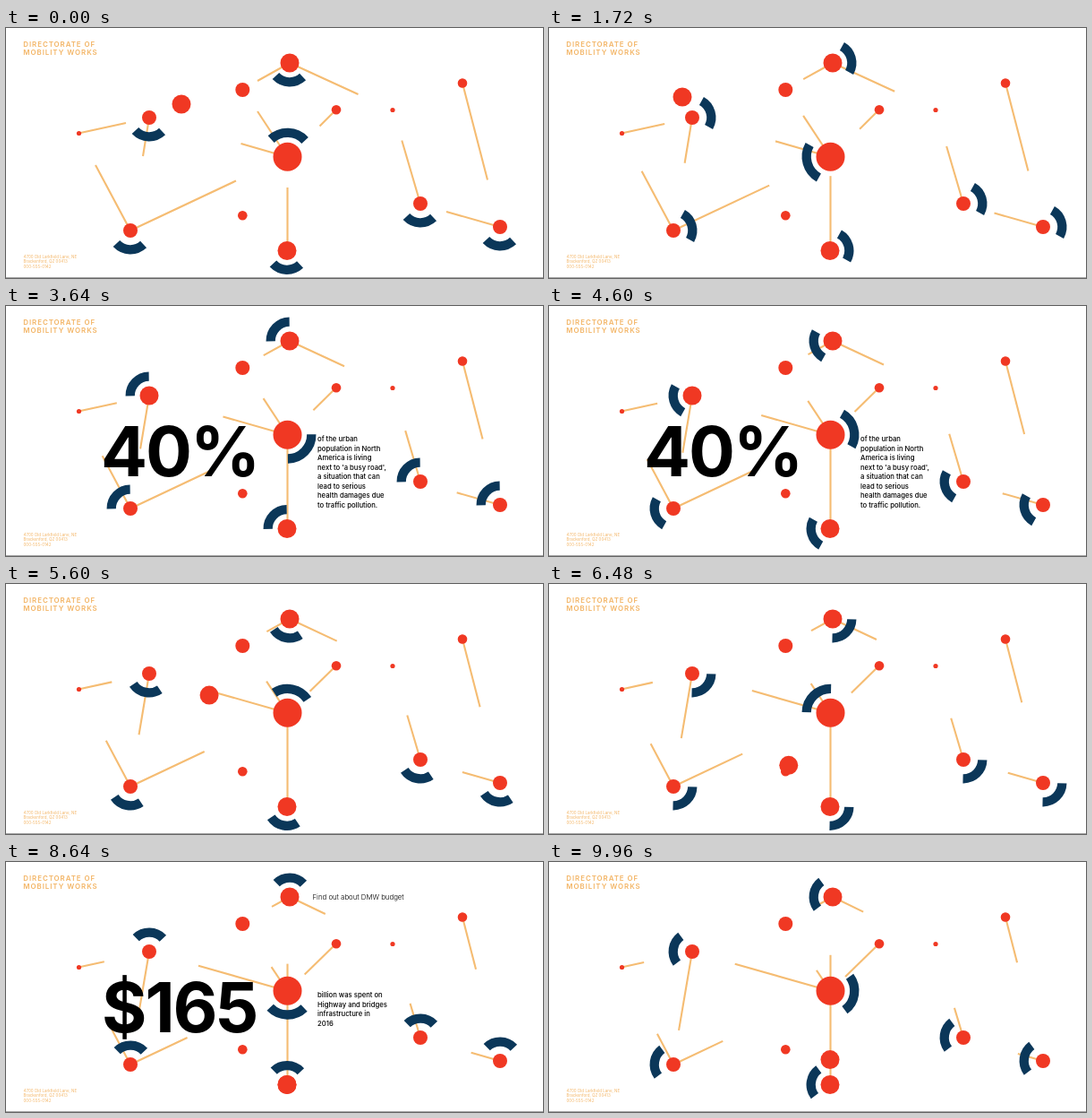
An HTML page that plays this animation: 600x279 px, repeating every 10000 ms.

```html
<!DOCTYPE html>
<html lang="en">
<head>
<meta charset="utf-8">
<style>
  html, body { margin: 0; width: 100%; height: 100%; overflow: hidden; background: #fff; }
  svg { display: block; width: 600px; height: 279px; font-family: Inter, sans-serif; }
  .line { stroke: #f5bc72; stroke-width: 2.1; }
  .arc { fill: none; stroke: #0b3759; stroke-width: 10.3; }
  .disc { fill: #f03823; }
  .gold { fill: #f3b566; }
  .head { font-size: 7.9px; font-weight: 600; letter-spacing: .95px; }
  .contact { font-size: 4.5px; }
  .big { font-size: 77px; font-weight: 700; letter-spacing: -2px; }
  .body { font-size: 7.7px; font-weight: 500; }
  .note { font-size: 7.8px; font-weight: 300; }
</style>
</head>
<body>
<svg id="stage" viewBox="0 0 600 279"></svg>
<script>
const LOOP = 10000;
const stage = document.getElementById('stage');

function add(tag, attrs, parent = stage) {
  const el = document.createElementNS('http://www.w3.org/2000/svg', tag);
  for (const key in attrs) el.setAttribute(key, attrs[key]);
  parent.append(el);
  return el;
}

function addText(cls, x, y, leading, lines, parent = stage) {
  lines.forEach((line, i) => {
    add('text', { class: cls, x, y: y + i * leading }, parent).textContent = line;
  });
}

// anchor x, y, free end at loop start, free end at loop end
const lines = [
  [81, 117.5, 134, 106, 106, 112],
  [160, 100, 153, 143, 145, 188],
  [139, 226, 100, 153, 121, 192],
  [139, 226, 257, 170.5, 194, 200],
  [317, 39, 281, 59, 299.5, 48.5],
  [317, 39, 393.5, 74, 351, 55.5],
  [314.5, 144, 281, 93, 299, 121],
  [314.5, 144, 262.5, 129, 207.5, 113.7],
  [369, 91, 350.5, 109.5, 331, 128],
  [314.5, 248.5, 314.5, 178, 314.5, 103.5],
  [510, 61.5, 538, 169.5, 523, 112],
  [463, 196, 442.3, 125.5, 453, 163],
  [552, 222, 492, 205, 524, 214]
].map(ends => ({
  ends,
  el: add('line', { class: 'line', x1: ends[0], y1: ends[1] })
}));

// x, y, radius
const nodes = [
  [160, 100, 8], [317, 39, 10.5], [139, 226, 8], [314, 248.5, 10.5],
  [463, 196, 8], [552, 222, 8], [314.5, 143.7, 16],
  [81.5, 117.5, 2.6], [264.3, 69, 8], [369, 91.3, 5.3],
  [432, 91.5, 2.6], [510, 61.5, 5.3], [264.3, 209.3, 5.3]
];

// the first seven nodes carry an arc; the large one is half a turn ahead
const arcs = nodes.slice(0, 7).map(([x, y, size]) => {
  const large = size === 16, r = large ? 26.8 : 21.3, c = r * Math.SQRT1_2;
  const el = add('path', { class: 'arc', d: `M${c} ${-c}A${r} ${r} 0 0 1 ${c} ${c}` });
  return { x, y, offset: large ? 180 : 0, el };
});
nodes.forEach(([cx, cy, r]) => add('circle', { class: 'disc', cx, cy, r }));
const ball = add('circle', { class: 'disc', r: 10.5 });

addText('gold head', 19.3, 21, 9.2, ['DIRECTORATE OF', 'MOBILITY WORKS']);
addText('gold contact', 19.5, 256.5, 5.9,
  ['4700 Old Larkfield Lane, NE', 'Brackenford, QZ 00413', '000-555-0142']);
add('rect', { y: 278, width: 600, height: 1, fill: '#a8a8a8' });

function addCard(from, to, x, title, copy) {
  const el = add('g', {});
  addText('big', x, 190, 0, [title], el);
  addText('body', 348, 151, 10.5, copy, el);
  return { from, to, el };
}

const cards = [
  addCard(2400, 5260, 106, '40%', ['of the urban', 'population in North', 'America is living',
    "next to 'a busy road',", 'a situation that can', 'lead to serious',
    'health damages due', 'to traffic pollution.']),
  addCard(6900, 9500, 107, '$165', ['billion was spent on', 'Highway and bridges',
    'infrastructure in', '2016'])
];
addText('note', 342.5, 41.8, 0, ['Find out about DMW budget'], cards[1].el);

// time, x, y of the travelling ball
const route = [
  [0, 196, 85], [1720, 149, 77], [2640, 157.5, 93], [3300, 160, 100], [4700, 160, 100],
  [5600, 227, 124], [6400, 264, 196], [7200, 300, 248], [7900, 314, 248.5],
  [9250, 314, 248.5], [10000, 314, 219]
];

function slope(i, axis) {
  const a = route[Math.max(i - 1, 0)], b = route[i], c = route[Math.min(i + 1, route.length - 1)];
  const resting = p => p !== b && p[1] === b[1] && p[2] === b[2];
  return resting(a) || resting(c) ? 0 : (c[axis] - a[axis]) / (c[0] - a[0]);
}

function routeAt(t, axis) {
  let i = 0;
  while (i < route.length - 2 && t >= route[i + 1][0]) i++;
  const a = route[i], b = route[i + 1], span = b[0] - a[0], u = (t - a[0]) / span;
  const ease = u * u * (3 - 2 * u);
  return a[axis] + (b[axis] - a[axis]) * ease
    + span * u * (1 - u) * (slope(i, axis) * (1 - u) - slope(i + 1, axis) * u);
}

function draw() {
  const t = performance.now() % LOOP, p = t / LOOP;
  for (const { ends: [, , x0, y0, x1, y1], el } of lines) {
    el.setAttribute('x2', x0 + (x1 - x0) * p);
    el.setAttribute('y2', y0 + (y1 - y0) * p);
  }
  const turn = 92 - 626 * p;
  for (const { x, y, offset, el } of arcs) {
    el.setAttribute('transform', `translate(${x} ${y}) rotate(${turn + offset})`);
  }
  ball.setAttribute('cx', routeAt(t, 1));
  ball.setAttribute('cy', routeAt(t, 2));
  for (const { from, to, el } of cards) {
    el.setAttribute('visibility', t >= from && t < to ? 'visible' : 'hidden');
  }
  requestAnimationFrame(draw);
}
draw();
</script>
</body>
</html>
```
